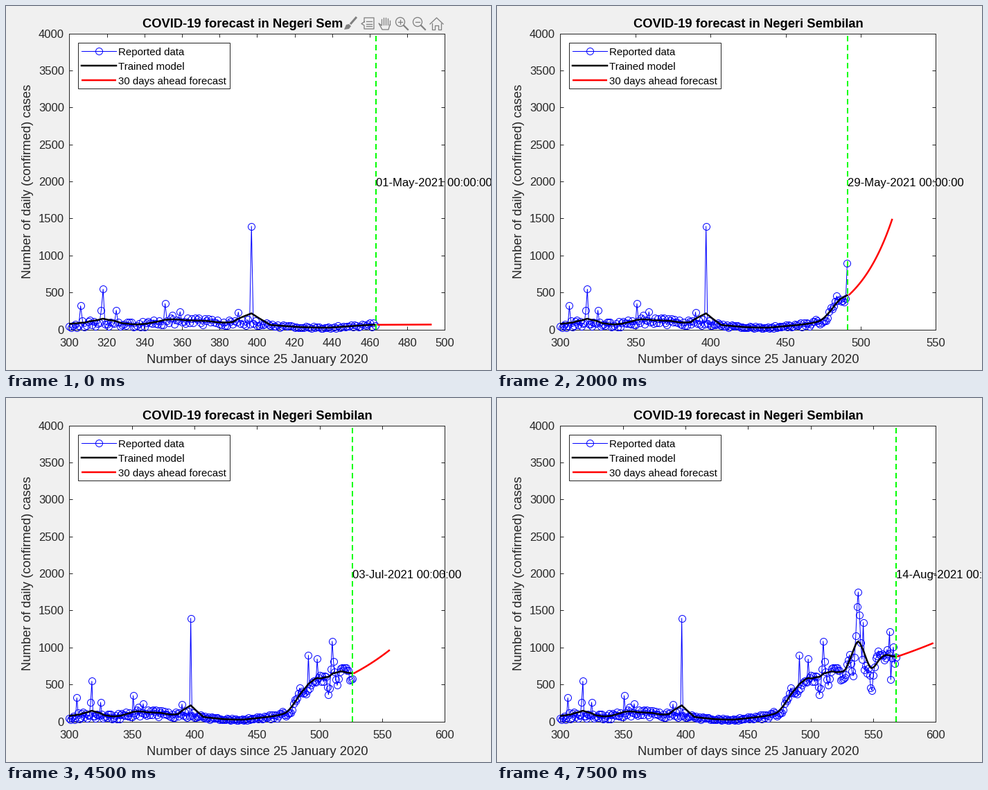
These frames come from a looping animation (700 px wide and 525 px high, 8 s). A matplotlib script:

```python
import numpy as np
import matplotlib.pyplot as plt
from matplotlib.animation import FuncAnimation
from matplotlib.patches import Circle, Polygon, Rectangle

W, H, DPI = 700, 525, 100
LEFT, RIGHT, TOP, BOTTOM = 91.4, 633.4, 39.6, 466.6
FRAMES, STEP = 16, 500
DAY0, FIRST_END, HORIZON = 300, 463, 30
LAST_DAY = FIRST_END + 7 * (FRAMES - 1)
DARK, PANEL, ICON = "#262626", "#f0f0f0", "#808080"
PX = 72 / DPI
SMALL, NORMAL, LARGE = 15, 50 / 3, 55 / 3

plt.rcParams["font.family"] = "Liberation Sans"

# Key points (day, cases) of the epidemic curve
LEVEL = [(300, 95), (313, 75), (325, 85), (340, 72), (352, 125), (360, 150),
         (370, 100), (388, 108), (403, 72), (412, 42), (437, 22), (463, 72),
         (477, 130), (484, 400), (489, 380), (494, 480), (505, 620), (507, 330),
         (510, 800), (514, 520), (518, 720), (527, 560), (531, 870), (534, 560),
         (537, 1540), (539, 1620), (541, 770), (545, 720), (549, 450),
         (552, 870), (558, 850), (561, 990), (565, 960), (568, 780)]

# Single days that leave the curve
PEAKS = {306: 320, 317: 260, 318: 545, 325: 260, 351: 350, 359: 240, 390: 235,
         397: 1395, 491: 895, 498: 845, 510: 1085, 542: 1340, 563: 1215, 564: 565}

# Key points (week, log growth over the horizon) of the forecast
GROWTH = [(0, 0.05), (2, 0.14), (4, 1.17), (6, 0.72), (9, 0.4), (11, 0.93),
          (13, 0.3), (15, 0.19)]


def make_cases(days):
    rng = np.random.default_rng(25)
    spread = np.interp(days, [300, 345, 465, 485], [0.75, 0.55, 0.5, 0.12])
    noise = spread * rng.uniform(-1, 1, len(days))
    cases = np.maximum(np.interp(days, *zip(*LEVEL)) * (1 + noise), 10)
    for day, value in PEAKS.items():
        cases[day - DAY0] = value
    return cases


def moving_mean(v, back, ahead):
    return np.array([v[max(0, i - back):i + ahead + 1].mean()
                     for i in range(len(v))])


days = np.arange(DAY0, LAST_DAY + 1)
cases = make_cases(days)

fig = plt.figure(figsize=(W / DPI, H / DPI), dpi=DPI, facecolor=PANEL)
ax = fig.add_axes([LEFT / W, 1 - BOTTOM / H, (RIGHT - LEFT) / W, (BOTTOM - TOP) / H])
ax.set_ylim(0, 4000)
ax.set_yticks(range(0, 4001, 500))
ax.tick_params(direction="in", top=True, right=True, length=5.4 * PX, width=PX,
               color=DARK, labelbottom=False, labelleft=False)
for spine in ax.spines.values():
    spine.set(color=DARK, linewidth=PX)

# Overlay in pixels, origin at the top left
page = fig.add_axes([0, 0, 1, 1], zorder=2)
page.set(xlim=(0, W), ylim=(H, 0))
page.axis("off")

REPORTED = dict(color="blue", lw=PX, marker="o", ms=10 * PX, mfc="none", mew=PX)
TRAINED = dict(color="black", lw=2.5 * PX)
AHEAD = dict(color="red", lw=2.5 * PX, solid_capstyle="butt")

reported, = ax.plot([], [], clip_on=False, zorder=3, **REPORTED)
trained, = ax.plot([], [], zorder=3.1, **TRAINED)
ahead, = ax.plot([], [], zorder=3.2, **AHEAD)
today, = page.plot([], [], color="lime", lw=2 * PX, dashes=(4, 2.5),
                   dash_capstyle="butt")


def label(x, y, text="", px=NORMAL, color=DARK, ha="center", va="baseline", **kw):
    return page.text(x, y, text, fontsize=px * PX, color=color, ha=ha, va=va, **kw)


mid_x, mid_y = (LEFT + RIGHT) / 2, (TOP + BOTTOM) / 2
label(mid_x, 31, "COVID-19 forecast in Negeri Sembilan", LARGE, "black", weight="bold")
label(mid_x, 515, "Number of days since 25 January 2020", LARGE)
label(40, mid_y, "Number of daily (confirmed) cases", LARGE, ha="right",
      va="center", rotation=90)
for v in range(0, 4001, 500):
    label(84, BOTTOM - v / 4000 * (BOTTOM - TOP) + 6, str(v), ha="right")
x_labels = [label(0, 491) for _ in range(11)]
date = label(0, 260, color="black", ha="left")

# Legend
page.add_patch(Rectangle((104.4, 52.6), 219, 66, fc="white", ec=DARK, lw=PX))
for y, text, style in [(65, "Reported data", REPORTED),
                       (86, "Trained model", TRAINED),
                       (107, "30 days ahead forecast", AHEAD)]:
    page.plot([109, 134, 159], [y] * 3, markevery=[1], **style)
    label(162, y + 5.6, text, SMALL, "black", ha="left")

toolbar = []


def stroke(*points, lw=1.3):
    toolbar.extend(page.plot(*zip(*points), color=ICON, lw=lw * PX, zorder=5))


def patch(shape):
    toolbar.append(page.add_patch(shape))


def draw_toolbar():
    patch(Rectangle((485.5, 11), 148, 27, fc=PANEL, ec="none", zorder=4))
    # Brush
    stroke((505, 17), (498, 25), lw=3)
    patch(Polygon([(488, 34), (491, 27), (495, 26), (498, 29), (495, 33)],
                  fc=ICON, ec="none", zorder=5))
    # Data tip
    stroke((517, 23), (517, 17), (531, 17), (531, 33), (517, 33), (517, 28),
           (513, 25.5), (517, 23))
    for y in (22, 25.5, 29):
        stroke((520, y), (528, y))
    # Hand
    for x, top in zip(range(542, 555, 3), (19, 17, 17, 18, 21)):
        stroke((x, top), (x, 27))
    stroke((542, 28), (538, 25), (543, 34), (552, 34), (554, 27))
    # Zoom in, zoom out
    for x in (569, 594):
        patch(Circle((x, 23), 6.5, fc="none", ec=ICON, lw=1.3 * PX, zorder=5))
        stroke((x + 5, 28), (x + 11, 34), lw=2.2)
        stroke((x - 3, 23), (x + 3, 23))
    stroke((569, 20), (569, 26))
    # Home
    stroke((612, 26), (621.5, 17), (631, 26))
    stroke((615, 25), (615, 34), (619, 34), (619, 28), (624, 28), (624, 34),
           (628, 34), (628, 25))


draw_toolbar()


def update(week):
    end = FIRST_END + 7 * week
    n = end - DAY0 + 1
    x_max = -(-(end + HORIZON) // 50) * 50

    def to_px(day):
        return LEFT + (day - DAY0) / (x_max - DAY0) * (RIGHT - LEFT)

    ticks = range(DAY0, x_max + 1, 20 if x_max == 500 else 50)
    ax.set_xlim(DAY0, x_max)
    ax.set_xticks(ticks)
    for text in x_labels:
        text.set_text("")
    for text, day in zip(x_labels, ticks):
        text.set_text(str(day))
        text.set_x(to_px(day))

    model = moving_mean(moving_mean(cases[:n], 4, 5), 5, 4)
    growth = np.interp(week, *zip(*GROWTH))
    reported.set_data(days[:n], cases[:n])
    trained.set_data(days[:n], model)
    ahead.set_data(end + 1 + np.arange(HORIZON),
                   model[-1] * np.exp(growth * np.linspace(0, 1, HORIZON)))

    x_today = np.ceil(to_px(end))
    today.set_data([x_today, x_today], [BOTTOM, TOP])
    when = (np.datetime64("2021-05-01") + 7 * week).astype(object)
    date.set_text(when.strftime("%d-%b-%Y 00:00:00"))
    date.set_x(x_today)
    for part in toolbar:
        part.set_visible(week == 0)
    return []


anim = FuncAnimation(fig, update, frames=FRAMES, interval=STEP, repeat=True)
plt.show()
```
